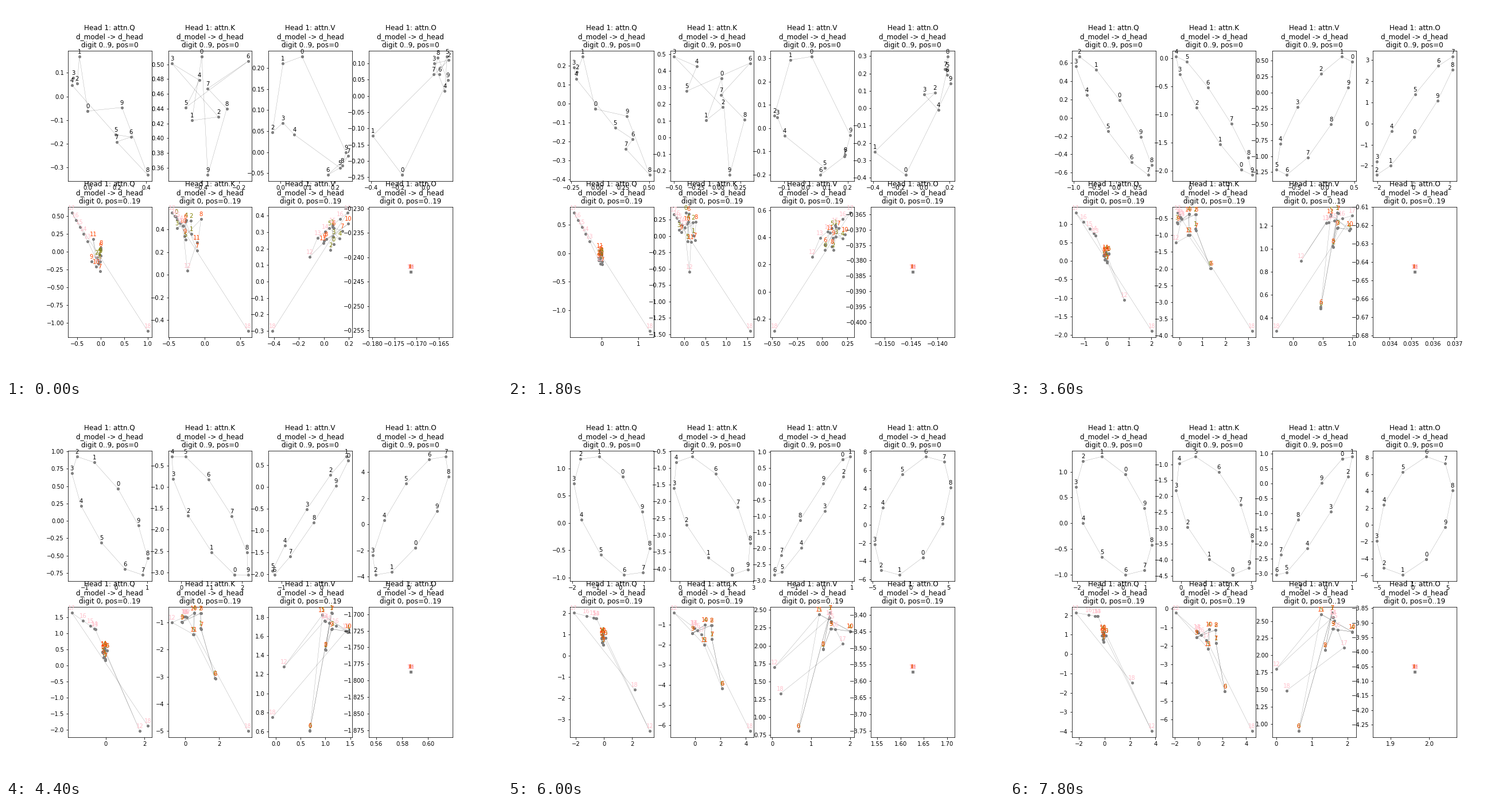
A matplotlib script that plays this animation: 864x648 px, repeating every 8000 ms.

```python
import numpy as np
import matplotlib.pyplot as plt
from matplotlib.animation import FuncAnimation

FRAMES, STEP = 40, 200
MID, END = 2800, 7800  # the digits form a ring by MID, which opens until END
NAMES = "QKVO"
COLORS = ["olive"] * 6 + ["orangered"] * 6 + ["pink"] * 7

# Early places of digits 0..9 as fractions of the panel.
SCATTER = {
    "Q": [(.21, .54), (.10, 1), (.07, .77), (.02, .82), (0, .76),
          (.58, .34), (.78, .32), (.59, .28), (1, 0), (.66, .57)],
    "K": [(.39, 1), (.26, .46), (.61, .49), (0, .94), (.36, .8),
          (.18, .57), (1, .96), (.47, .73), (.72, .56), (.47, 0)],
    "V": [(.39, 1), (.14, .94), (0, .36), (.14, .44), (.29, .34),
          (.89, .06), (.73, 0), (1, .16), (.92, .08), (.97, .19)],
    "O": [(.39, 0), (0, .33), (1, .97), (.81, .94), (.95, .71),
          (.98, 1), (.88, .85), (.80, .85), (.86, .99), (.99, .8)],
}
# Digit at which x and y peak on the ring, at MID and at END.
PEAKS = {"Q": [(7.6, 2.5), (8, 1.3)], "K": [(9, 4), (8.3, 4.8)],
         "V": [(-1, .8), (1.2, .6)], "O": [(7.2, 7.3), (8, 6.2)]}

# Data corners (low x, low y), (high x, high y) at the start, MID and END.
TOP = {
    "Q": [[(-.107, -.332), (.411, .169)], [(-.334, -.419), (.598, .325)], [(-2.07, -1), (1.28, 1.295)]],
    "K": [[(-.554, .3505), (-.153, .5105)], [(-.449, -.766), (.84, .46)], [(-.214, -4.47), (3.04, -.757)]],
    "V": [[(-.03, -.054), (.249, .227)], [(-.256, -.34), (.178, .384)], [(-1.84, -3.04), (1, .895)]],
    "O": [[(-.389, -.243), (.169, .121)], [(-.387, -.516), (.248, .464)], [(-5.1, -5.93), (5.69, 8.1)]],
}
LOW = {
    "Q": [[(-.61, -1.116), (1, .543)], [(-.912, -1.613), (1.62, .871)], [(-2.25, -3.98), (3.71, 2.127)]],
    "K": [[(-.522, -.498), (.608, .568)], [(-.194, -2.353), (2.452, .169)], [(-1.89, -6.63), (4.49, -.21)]],
    "V": [[(-.414, -.301), (.2015, .417)], [(-.535, -.278), (.384, .734)], [(0, .893), (2.61, 2.744)]],
}
# Early and late: cluster centre, its spread, trail start, trail end, position 12, position 18.
SHAPE = {
    "Q": [[(.31, .64), (.07, .06), (.21, .76), (0, 1), (.35, .57), (1, 0)],
          [(.34, .83), (.03, .09), (.29, .97), (0, 1), (1, 0), (.74, .41)]],
    "K": [[(.19, .83), (.11, .1), (.19, .87), (.06, .98), (.25, .5), (1, 0)],
          [(.37, .77), (.16, .1), (.28, .84), (.4, .77), (0, 1), (1, 0)]],
    "V": [[(.79, .76), (.1, .13), (.59, .79), (.98, 1), (.49, .63), (0, 0)],
          [(.6, .75), (.25, .2), (.61, .9), (.73, .66), (0, .49), (.11, .32)]],
}

rng = np.random.default_rng(4)
JITTER = {n: rng.uniform(-1, 1, (6, 2)) for n in SHAPE}
GAP = {n: rng.uniform(-.15, .15, (6, 2)) for n in SHAPE}


def mix(a, b, w):
    return (1 - w) * np.asarray(a, float) + w * np.asarray(b, float)


def early(t, power):
    return min(t / MID, 1) ** power


def late(t):
    u = np.clip((t - MID) / (END - MID), 0, 1)
    return 1 - (1 - u) ** 2.5


def corners(keys, t):
    return mix(mix(keys[0], keys[1], early(t, 1.5)), keys[2], late(t))


def digits(name, t):
    peak = mix(*PEAKS[name], late(t))
    ring = .5 + .5 * np.cos(2 * np.pi * (np.arange(10)[:, None] - peak) / 10)
    unit = mix(SCATTER[name], ring, early(t, 3))
    unit = (unit - unit.min(0)) / np.ptp(unit, axis=0)
    lo, hi = corners(TOP[name], t)
    return lo + unit * (hi - lo)


def positions(name, t):
    zero = digits(name, t)[0]
    if name == "O":  # every position shares one point
        return np.tile(zero, (19, 1))
    lo, hi = corners(LOW[name], t)
    centre, spread, begin, end, p12, p18 = mix(*SHAPE[name], late(t))
    first = centre + spread * JITTER[name]
    first[0] = (zero - lo) / (hi - lo)
    second = first + GAP[name] * np.exp(-t / 1500)
    along = np.linspace(0, 1, 5)[:, None] ** (1 + 2 * late(t))
    unit = np.vstack([first, second, p12, mix(begin, end, along), p18])
    return lo + np.clip(unit, 0, 1) * (hi - lo)


class Panel:
    def __init__(self, ax, name, place, note, colors, closed):
        self.ax, self.name, self.place, self.closed = ax, name, place, closed
        ax.set_title(f"Head 1: attn.{name}\nd_model -> d_head\n{note}")
        self.line, = ax.plot([], [], "o-", color="gray", lw=0.3, ms=4)
        self.tags = [ax.annotate(str(i), (0, 0), xytext=(0, 5), ha="center", color=c,
                                 textcoords="offset points", annotation_clip=False)
                     for i, c in enumerate(colors)]

    def show(self, t):
        pts = self.place(self.name, t)
        for tag, p in zip(self.tags, pts):
            tag.xy = p
        if self.closed:
            pts = np.vstack([pts, pts[:1]])
        self.line.set_data(*pts.T)
        self.ax.relim()
        self.ax.autoscale_view()


fig, axes = plt.subplots(2, 4, figsize=(12, 9), dpi=72)
panels = []
for c, name in enumerate(NAMES):
    panels.append(Panel(axes[0, c], name, digits, "digit 0..9, pos=0", ["black"] * 10, True))
    panels.append(Panel(axes[1, c], name, positions, "digit 0, pos=0..19", COLORS, False))


def update(i):
    for panel in panels:
        panel.show(i * STEP)


anim = FuncAnimation(fig, update, frames=FRAMES, interval=STEP,
                     init_func=lambda: update(0), repeat=True, repeat_delay=0)
plt.show()
```
